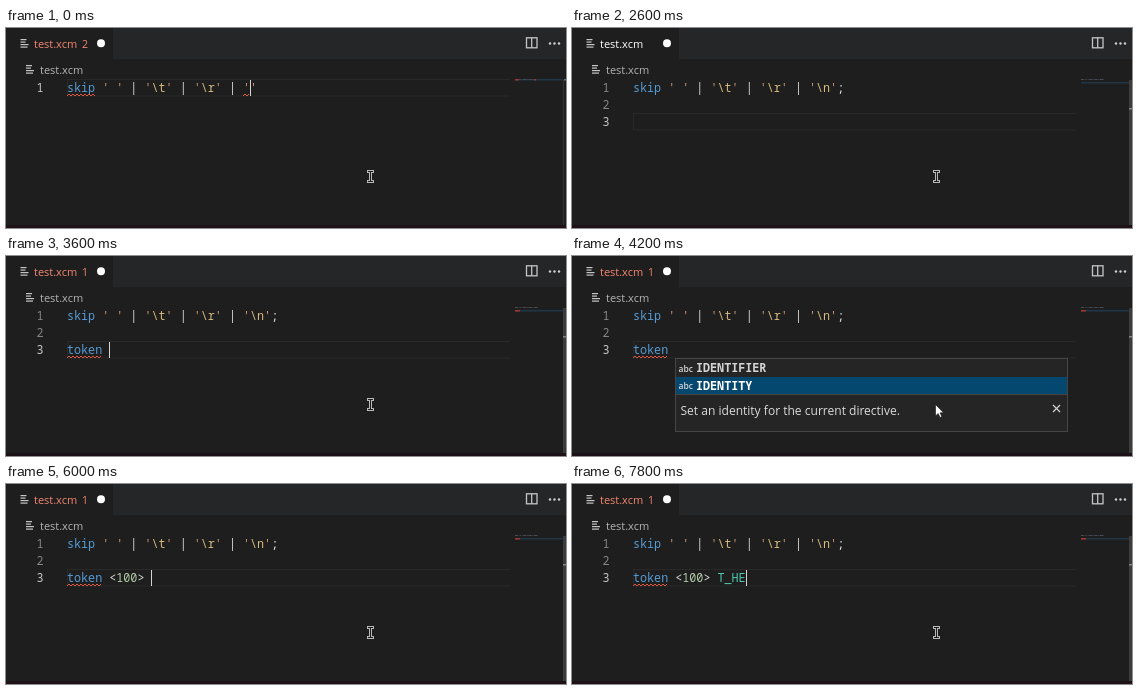
These frames come from a looping animation (560x200 px, 8 s). An HTML page with a canvas:

```html
<!DOCTYPE html>
<html lang="en">
<head>
<meta charset="utf-8">
<title>Editor typing</title>
<style>
  html, body { margin: 0; width: 100%; height: 100%; overflow: hidden; background: #1e1e1e; }
  canvas { display: block; }
</style>
</head>
<body>
<canvas id="stage" width="560" height="200"></canvas>
<script>
const ctx = document.getElementById('stage').getContext('2d');
const LOOP = 8000, LEFT = 61, ADVANCE = 7.04, LINE_HEIGHT = 17;
const mono = weight => `${weight} 11.73px "Noto Sans Mono", "DejaVu Sans Mono", monospace`;
const ui = (size, weight = 400) => `${weight} ${size}px "Open Sans", "Noto Sans", sans-serif`;

const SKIP = "skip ' ' | '\\t' | '\\r' | ";
const DONE = SKIP + "'\\n';";
const IDENTITY = {
  col: 6, items: ['IDENTIFIER', 'IDENTITY'], selected: 1,
  note: 'Set an identity for the current directive.'
};
const TOKEN = { col: 0, items: ['token'], selected: 0, note: 'Declare a token.' };

// Each step: start time, lines, caret column (-1 while blinked off), error count, popup
const first = (time, tail, caret, errors) => [time, [SKIP + tail], caret, errors];
const third = (time, text, caret = text.length, errors = 1, popup) =>
  [time, [DONE, '', text], caret, errors, popup];
const steps = [
  first(0, "''", 26, 2),
  first(400, "'\\'", 27, 2),
  first(600, "'\\n'", 28, 2),
  first(800, "'\\n'", 28, 1),
  first(1000, "'\\n'", 29, 1),
  first(1800, "'\\n';", 30, 1),
  first(2000, "'\\n';", 30, 0),
  [2200, [DONE, ''], 0, 0],
  third(2400, '', 0, 0),
  third(2600, '', -1, 0),
  third(2800, 't', 1, 0),
  third(3000, 'to', 2, 1, TOKEN),
  third(3200, 'token'),
  third(3400, 'token '),
  third(4000, 'token ', -1, 1, IDENTITY),
  third(5000, 'token <>', 7),
  third(5200, 'token <1>', 8),
  third(5400, 'token <10>', 9),
  third(5600, 'token <100>', 10),
  third(5800, 'token <100>'),
  third(6000, 'token <100> '),
  third(6400, 'token <100> ', -1),
  third(6800, 'token <100> '),
  third(7000, 'token <100> T'),
  third(7200, 'token <100> T_'),
  third(7600, 'token <100> T_H'),
  third(7800, 'token <100> T_HE')
];

function rect(x, y, w, h, color) {
  ctx.fillStyle = color;
  ctx.fillRect(x, y, w, h);
}

function text(value, x, y, color, font, align = 'left') {
  ctx.font = font;
  ctx.textAlign = align;
  ctx.fillStyle = color;
  ctx.fillText(value, x, y);
}

function stroke(points, color, width = 1) {
  ctx.beginPath();
  points.forEach(([x, y]) => ctx.lineTo(x, y));
  ctx.strokeStyle = color;
  ctx.lineWidth = width;
  ctx.stroke();
}

function frame(x, y, w, h, color, width = 1) {
  ctx.strokeStyle = color;
  ctx.lineWidth = width;
  ctx.strokeRect(x, y, w, h);
}

function disc(x, y, r) {
  ctx.beginPath();
  ctx.arc(x, y, r, 0, Math.PI * 2);
  ctx.fill();
}

function fileIcon(x, y) {
  [[0, 6], [0, 5], [0, 8], [0, 7]].forEach(([dx, w], i) =>
    rect(x + dx, y + i * 2.5, w, 1.2, '#c5c5c5'));
}

function drawChrome(errors) {
  rect(0, 0, 560, 200, '#1e1e1e');
  rect(107, 0, 453, 31, '#242627');
  rect(0, 197, 560, 3, '#1c1218');

  const titleColor = errors ? '#f48771' : '#ffffff';
  fileIcon(14.5, 11);
  text('test.xcm', 28, 20, titleColor, ui(11));
  if (errors) text(errors, 76, 19.5, titleColor, ui(10.5));
  ctx.fillStyle = '#ffffff';
  disc(95, 15.2, 4);

  fileIcon(20, 37);
  text('test.xcm', 34, 45.5, '#b4b4b4', ui(11));

  frame(520.5, 9.8, 10.5, 10, '#c5c5c5', 1.3);
  stroke([[525.7, 9.8], [525.7, 19.8]], '#c5c5c5', 1.3);
  ctx.fillStyle = '#d0d0d0';
  [544, 548.5, 553].forEach(x => disc(x, 15.5, 1.2));
}

function colorOf(part) {
  if (/^(skip|t|to|tok|token)$/.test(part)) return '#569cd6';
  if (part === "'") return '#d69a78';
  if (part[0] === '\\') return '#d7ba7d';
  if (/^\d/.test(part)) return '#b5cea8';
  if (/^T/.test(part)) return '#4ec9b0';
  return '#dcdcdc';
}

function drawCode(line, baseline) {
  for (const match of line.matchAll(/\\\w?|\w+|[^\s\w]/g))
    text(match[0], LEFT + match.index * ADVANCE, baseline, colorOf(match[0]), mono(500));
}

function squiggle(col, length, y) {
  const points = [];
  for (let dx = 0, i = 0; dx <= length * ADVANCE; dx += 2, i++)
    points.push([LEFT + col * ADVANCE + dx, y + (i % 2 ? -1 : 1)]);
  stroke(points, '#e0583f');
}

function drawMinimap(lines, errors) {
  const last = lines.length - 1;
  const y = 51 + last * 1.5;
  rect(509, y, 48, 1.5, '#1f3748');
  for (const match of lines[0].matchAll(/\S+/g))
    rect(509 + match.index * 0.75, 51, match[0].length * 0.75, 1, '#474d52');
  if (errors) rect(509, y, last ? 5 : 4, 1.5, '#a5342f');
  if (errors > 1) rect(528, y, 2, 1.5, '#a5342f');
  if (last) {
    rect(557, 52, 3, 145, '#3c3c3c');
    rect(557, 80, 3, 1.5, '#858585');
  } else {
    rect(557, 52, 1, 145, '#353535');
    rect(558, 51, 2, 1.5, '#6c7478');
  }
}

function drawEditor(lines, caret, errors) {
  const last = lines.length - 1;
  const top = 51 + last * LINE_HEIGHT;
  frame(LEFT + 0.5, top + 0.5, 443, 16.5, '#292929');
  rect(504, top, 1, 18, '#1e1e1e');

  lines.forEach((line, i) => {
    const baseline = 64 + i * LINE_HEIGHT;
    text(i + 1, 37.5, baseline, i === last ? '#c6c6c6' : '#858585', mono(500), 'right');
    drawCode(line, baseline);
  });
  if (errors) squiggle(0, lines[last].match(/^\w*/)[0].length, top + 16);
  if (errors > 1) squiggle(25, 1, top + 16);
  if (caret >= 0) rect(Math.round(LEFT + caret * ADVANCE), top + 1, 1, 16, '#d4d4d4');
  drawMinimap(lines, errors);
}

function drawPopup({ col, items, selected, note }) {
  const x = Math.round(LEFT + col * ADVANCE) + 0.5, y = 102.5;
  const width = 392, row = 17.5;
  const noteTop = y + 1 + items.length * row;
  const height = noteTop + 37 - y;
  rect(x, y, width, height, '#252526');
  rect(x + 0.5, y + 1 + selected * row, width - 1, row, '#04476f');
  items.forEach((item, i) => {
    const baseline = y + 13.5 + i * row;
    text('abc', x + 3, baseline - 0.5, '#d8d8d8', ui(8.5, 600));
    text(item, x + 20.5, baseline, i === selected ? '#ffffff' : '#d4d4d4', mono(i === selected ? 700 : 600));
  });
  frame(x, y, width, height, '#454545');
  stroke([[x, noteTop], [x + width, noteTop]], '#454545');
  text(note, x + 5, noteTop + 20, '#dcdcdc', ui(12.05));
  const cx = x + 381, cy = noteTop + 14;
  stroke([[cx - 3.5, cy - 3.5], [cx + 3.5, cy + 3.5]], '#d0d0d0', 1.3);
  stroke([[cx - 3.5, cy + 3.5], [cx + 3.5, cy - 3.5]], '#d0d0d0', 1.3);
}

function drawPointer(isArrow) {
  if (isArrow) {
    const outline = [[0, 0], [0, 11.5], [2.7, 9], [4.5, 13], [6.3, 12.2], [4.6, 8.3], [8, 8.3]];
    ctx.beginPath();
    outline.forEach(([x, y]) => ctx.lineTo(363.5 + x, 148.5 + y));
    ctx.closePath();
    ctx.fillStyle = '#ffffff';
    ctx.fill();
    ctx.strokeStyle = '#111111';
    ctx.lineWidth = 0.6;
    ctx.stroke();
  } else {
    [142, 152].forEach(y => rect(361, y, 7, 3, '#b8b8b8'));
    rect(363, 143, 3, 11, '#b8b8b8');
    rect(364, 143, 1, 11, '#1e1e1e');
    [143, 153].forEach(y => rect(362, y, 5, 1, '#1e1e1e'));
  }
}

function draw() {
  const time = performance.now() % LOOP;
  const [, lines, caret, errors, popup] = steps.findLast(step => step[0] <= time);
  drawChrome(errors);
  drawEditor(lines, caret, errors);
  if (popup) drawPopup(popup);
  drawPointer(popup);
  requestAnimationFrame(draw);
}
draw();
</script>
</body>
</html>
```
